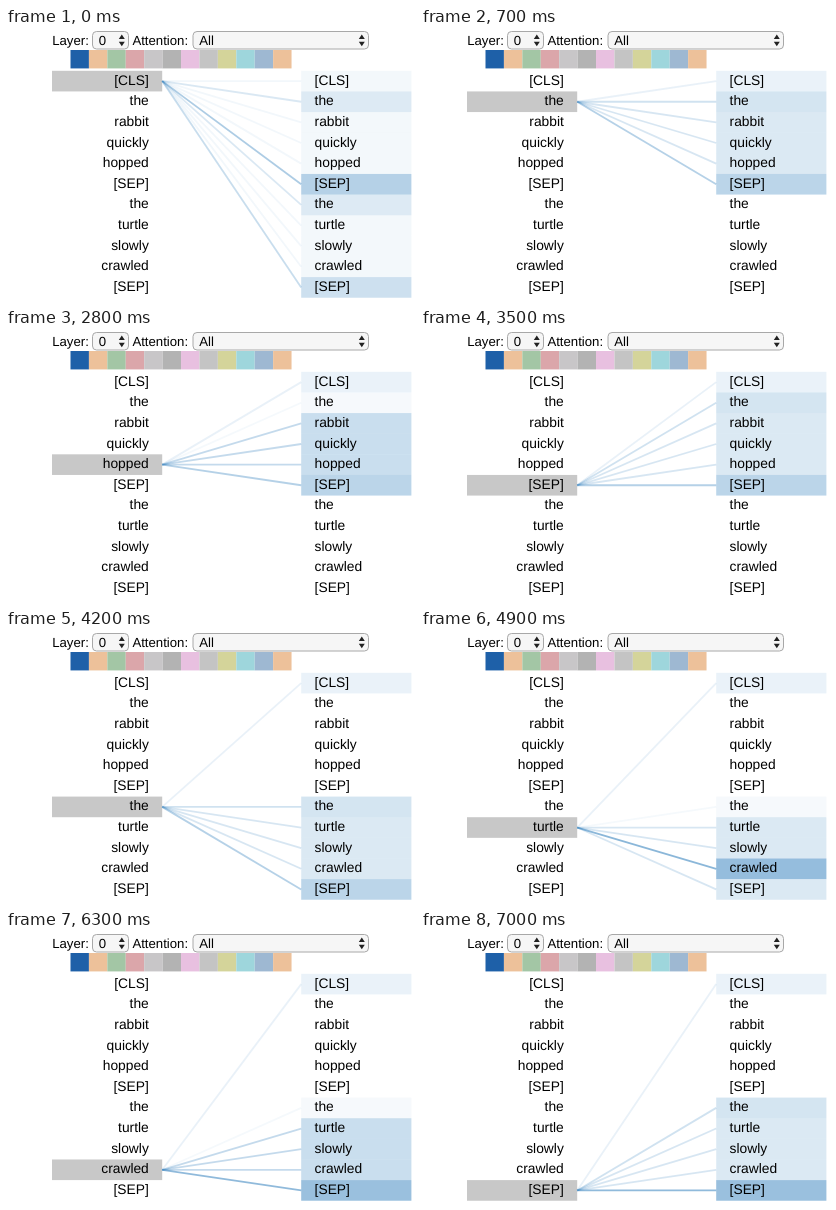
An HTML page that plays this animation: 409 by 273 pixels, repeating every 7.7 s.

```html
<!DOCTYPE html>
<html lang="en">
<head>
<meta charset="utf-8">
<title>Attention view</title>
<style>
  html, body { margin: 0; width: 100%; height: 100%; overflow: hidden; background: #fff; }
  svg { display: block; width: 409px; height: 273px; }
  text { font: 13.8px "Liberation Sans", Arial, sans-serif; fill: #000; text-rendering: geometricPrecision; }
  .control { font-size: 13.2px; }
  .select { fill: #f6f6f6; stroke: #a8a8a8; stroke-width: 1; }
  .arrows { fill: #222; }
</style>
</head>
<body>
<svg id="stage" viewBox="0 0 409 273"></svg>
<script>
const STEP = 700, TOP = 42.8, PITCH = 20.63, WIDTH = 110.2, SWATCH = 18.42;
const LEFT = 46, RIGHT = 295.2, BLUE = '#1f74b6';
const SLOTS = 5, ARTICLE = 0, NOUN = 1, VERB = 3, END = 4;
const words = ['[CLS]', 'the', 'rabbit', 'quickly', 'hopped', '[SEP]',
  'the', 'turtle', 'slowly', 'crawled', '[SEP]'];
const swatches = ['#1e60a8', '#edc19a', '#a3c6a5', '#dba6aa', '#c8c6c8', '#b3b3b3',
  '#e8c0e0', '#c4c4c4', '#d4d49a', '#9ed6dc', '#9eb8d2', '#edc19a'];

const stage = document.getElementById('stage');
const rowTop = i => TOP + i * PITCH;
const middle = i => rowTop(i) + PITCH / 2;
const slot = i => (i - 1) % SLOTS;
const sentence = i => Math.floor((i - 1) / SLOTS);

// The first token looks everywhere, mostly at articles and sentence ends.
function overview(to) {
  if (to === 0) return 0.05;
  if (slot(to) === END) return 0.33 - 0.11 * sentence(to);
  return slot(to) === ARTICLE ? 0.15 : 0.05;
}

// Other words look at their own sentence: nouns at the verb, the rest at its end.
function attention(from, to) {
  if (from === 0) return overview(to);
  if (to === 0) return 0.09;
  if (sentence(from) !== sentence(to)) return 0;
  const role = slot(from), target = slot(to);
  if (role === NOUN && target === VERB) return 0.47;
  if (role !== NOUN && target === END) return sentence(from) && role > NOUN ? 0.45 : 0.3;
  if (target === ARTICLE) return role === ARTICLE || role === END ? 0.19 : 0.04;
  return role === VERB ? 0.24 : 0.16;
}

function add(parent, tag, attrs = {}, content = '') {
  const node = document.createElementNS('http://www.w3.org/2000/svg', tag);
  for (const key in attrs) node.setAttribute(key, attrs[key]);
  node.textContent = content;
  return parent.appendChild(node);
}

function rowBox(parent, x, i, fill, opacity) {
  add(parent, 'rect', { x, y: rowTop(i), width: WIDTH, height: PITCH, fill,
    'fill-opacity': opacity });
}

function label(x, content) {
  add(stage, 'text', { class: 'control', x, y: 16.7 }, content);
}

function select(x, width, value) {
  add(stage, 'rect', { class: 'select', x, y: 3.5, width, height: 17.5, rx: 4 });
  label(x + 6.2, value);
  const mid = x + width - 6.7;
  add(stage, 'path', { class: 'arrows',
    d: `M${mid - 3} 11l3-4.5 3 4.5zM${mid - 3} 13.7l3 4.5 3-4.5z` });
}

function buildView(row) {
  const group = add(stage, 'g');
  rowBox(group, LEFT, row, '#c8c8c8', 1);
  words.forEach((_, to) => {
    const alpha = attention(row, to);
    if (!alpha) return;
    rowBox(group, RIGHT, to, BLUE, alpha);
    add(group, 'line', { x1: LEFT + WIDTH, y1: middle(row), x2: RIGHT, y2: middle(to),
      stroke: BLUE, 'stroke-width': 1.8, 'stroke-opacity': alpha * 1.1 });
  });
  return group;
}

label(46.2, 'Layer:');
select(86.5, 36, '0');
label(126.4, 'Attention:');
select(187, 175.5, 'All');
swatches.forEach((fill, i) => add(stage, 'rect', {
  x: 64.5 + i * SWATCH, y: 22, width: SWATCH, height: SWATCH, fill }));

const views = words.map((_, row) => buildView(row));

words.forEach((word, i) => {
  const y = 56.7 + i * PITCH;
  add(stage, 'text', { x: 142.8, y, 'text-anchor': 'end' }, word);
  add(stage, 'text', { x: 308.6, y }, word);
});

const start = performance.now();
function draw() {
  const time = Math.max(0, performance.now() - start);
  const active = Math.floor(time / STEP) % views.length;
  views.forEach((view, i) => view.setAttribute('display', i === active ? 'inline' : 'none'));
  requestAnimationFrame(draw);
}
draw();
</script>
</body>
</html>
```
